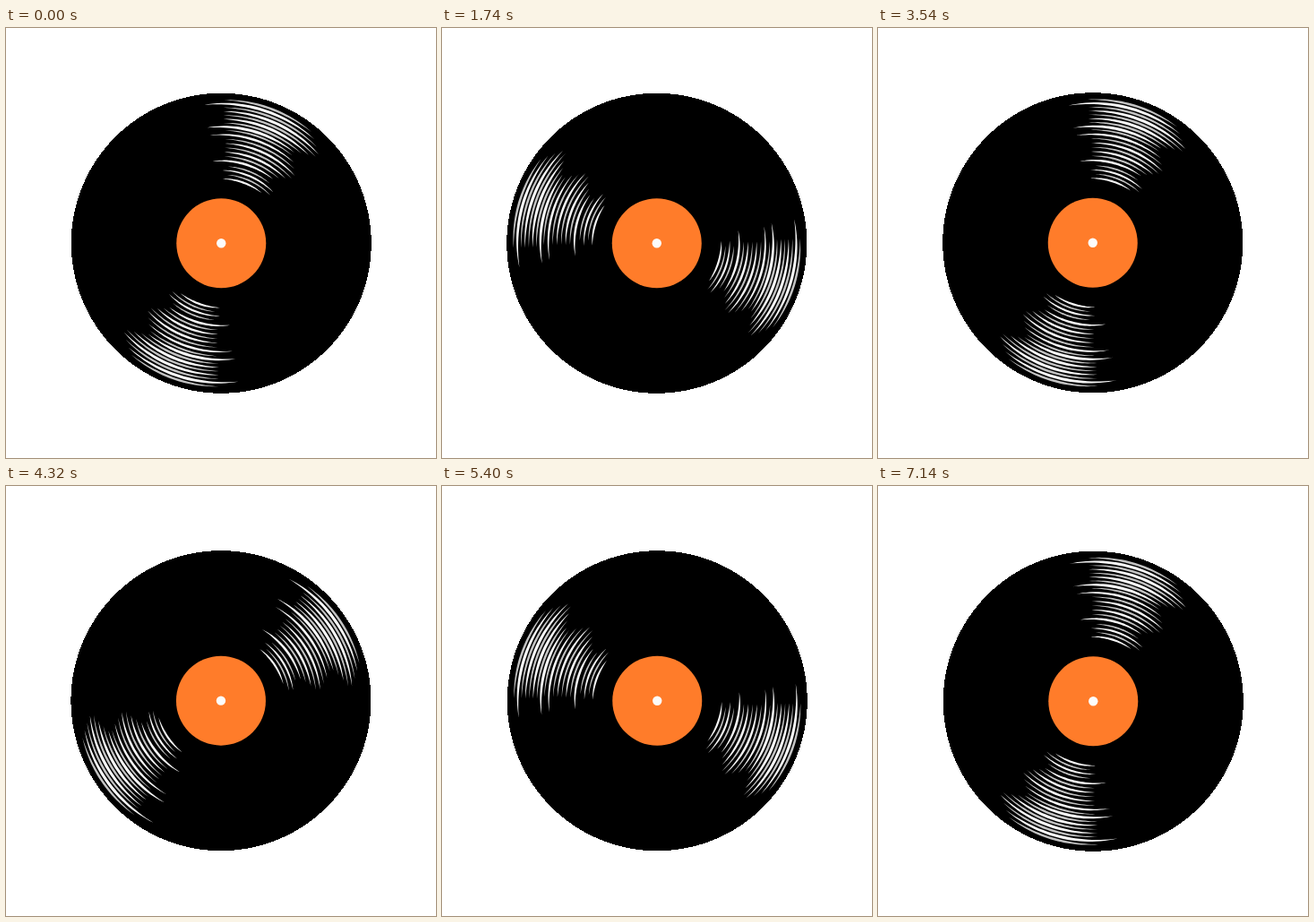
Animation of 480 by 480 pixels, one loop 7.2 s. Source, as an HTML page with a canvas:

```html
<!DOCTYPE html>
<html lang="en">
<head>
<meta charset="utf-8">
<title>Spinning record</title>
<style>
html, body { margin: 0; width: 100%; height: 100%; overflow: hidden; background: #fff; }
canvas { display: block; }
</style>
</head>
<body>
<canvas id="stage" width="480" height="480"></canvas>
<script>
const ctx = document.getElementById('stage').getContext('2d');
const LOOP = 7200, STEP = 60, MID = 240, OFFSET = 0.25, RADIUS = 167.5;
const RAD = Math.PI / 180;

// Groups of shine streaks, from the rim inwards
const bands = [
  { outer: 160, inner: 130, count: 8, width: 3.2, start: -89, reach: 8 },
  { outer: 126, inner: 92, count: 8, width: 2.6, start: -88, reach: 8 },
  { outer: 86, inner: 72, count: 4, width: 2.2, start: -85, reach: 4 }
];

function circle(r, color) {
  ctx.fillStyle = color;
  ctx.beginPath();
  ctx.arc(0, 0, r, 0, Math.PI * 2);
  ctx.fill();
}

// Hard-edged disc, filled row by row
function disc(cx, cy, r) {
  ctx.fillStyle = '#000';
  for (let y = Math.floor(cy - r); y <= cy + r; y++) {
    const dy = y + 0.5 - cy;
    if (Math.abs(dy) >= r) continue;
    const half = Math.sqrt(r * r - dy * dy);
    const left = Math.round(cx - half);
    ctx.fillRect(left, y, Math.round(cx + half) - left, 1);
  }
}

// Arc that tapers to a point at both ends
function streak(r, from, to, width, grey) {
  const n = 28;
  ctx.fillStyle = `rgb(${grey},${grey},${grey})`;
  ctx.beginPath();
  for (let i = 0; i <= 2 * n; i++) {
    const t = (i <= n ? i : 2 * n - i) / n;
    const side = i <= n ? 0.5 : -0.5;
    const d = r + side * width * Math.sin(Math.PI * t) ** 0.9;
    const a = (from + (to - from) * t) * RAD;
    ctx.lineTo(d * Math.cos(a), d * Math.sin(a));
  }
  ctx.fill();
}

// Bright and grey streaks alternate; the middle ones run furthest ahead,
// the second and the last trail furthest behind.
function shine({ outer, inner, count, width, start, reach }) {
  for (let i = 0; i < count; i++) {
    const u = i / (count - 1);
    const bright = i % 2 === 1;
    const trails = i === 1 || i === count - 1;
    const from = start - (trails ? reach : 0);
    const to = -41 - 10 * Math.abs(2 * u - 1);
    streak(outer + (inner - outer) * u, from, to,
      bright ? width : width * 0.8, bright ? 245 : 195);
  }
}

function draw(time) {
  const angle = Math.floor((time % LOOP) / STEP) * STEP / LOOP * Math.PI * 2;
  const c = Math.cos(angle), s = Math.sin(angle);
  const cx = MID + OFFSET * (c - s), cy = MID + OFFSET * (c + s);

  ctx.setTransform(1, 0, 0, 1, 0, 0);
  ctx.fillStyle = '#fff';
  ctx.fillRect(0, 0, 480, 480);
  disc(cx, cy, RADIUS);

  for (const turn of [0, Math.PI]) {
    ctx.setTransform(1, 0, 0, 1, cx, cy);
    ctx.rotate(angle + turn);
    bands.forEach(shine);
  }

  ctx.setTransform(1, 0, 0, 1, cx, cy);
  circle(50, '#ff7c2a');
  circle(5.2, '#fcfcfc');
}

let start = null;
function tick(now) {
  if (start === null) start = now;
  draw(Math.max(0, now - start));
  requestAnimationFrame(tick);
}
draw(0);
requestAnimationFrame(tick);
</script>
</body>
</html>
```
